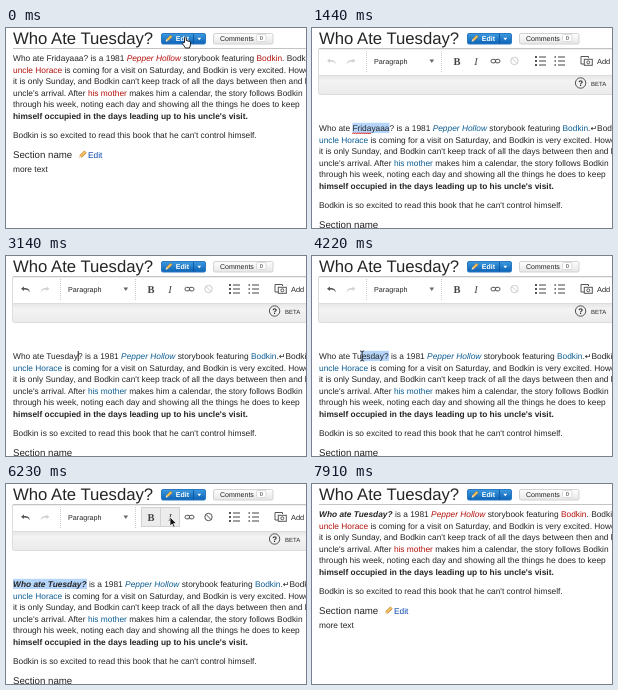
An HTML page for the animation above (8.26 s loop, 300 px wide and 200 px high).

```html
<!DOCTYPE html>
<html lang="en">
<head>
<meta charset="utf-8">
<title>Editing a page</title>
<style>
html, body { margin: 0; width: 100%; height: 100%; overflow: hidden; background: #fff; }
svg { display: block; width: 300px; height: 200px; }
text { font: 8.35px "Liberation Sans", Arial, sans-serif; fill: #252525; white-space: pre; text-rendering: geometricPrecision; }
.b { font-weight: bold; }
.i { font-style: italic; }
.link { fill: #b3100c; }
.edit .link { fill: #0b5c92; }
.edit .view { display: none; }
.blue { fill: #0645ad; }
.line { fill: none; stroke: #555; stroke-width: 1; }
.sep { stroke: #ccc; stroke-width: 1; stroke-dasharray: 1 1; }
.mark { font-family: "DejaVu Sans", sans-serif; font-size: 8px; }
.serif { font-family: "Liberation Serif", Times, serif; font-size: 10.5px; fill: #444; }
</style>
</head>
<body>
<svg viewBox="0 0 300 200">
  <defs>
    <linearGradient id="blue" x2="0" y2="1"><stop stop-color="#3d9ae0"/><stop offset="1" stop-color="#0b62b4"/></linearGradient>
    <linearGradient id="gray" x2="0" y2="1"><stop stop-color="#fff"/><stop offset="1" stop-color="#e6e6e6"/></linearGradient>
    <linearGradient id="band" x2="0" y2="1"><stop stop-color="#e6e6e6"/><stop offset=".3" stop-color="#f3f3f3"/><stop offset="1" stop-color="#ebebeb"/></linearGradient>
    <clipPath id="clip"><rect id="clipBox" y="20" width="300" height="0"/></clipPath>
    <g id="pencil">
      <path d="M2 6.6 7 1.6" stroke="#b9772a" stroke-width="3.2"/>
      <path d="M2.2 6.4 6.8 1.8" stroke="#f6c765" stroke-width="2"/>
      <path d="M0 8.6 1 5.4 3.2 7.6z" fill="#f4e3c4"/>
    </g>
    <path id="turn" d="M0 2.7 3 .4v1.6c3.7 0 5.5 1.1 5.8 4.4C7.6 4 6 3.4 3 3.4v1.6z"/>
  </defs>

  <g id="content">
    <rect id="sel" y="24.8" height="10.2" fill="#b5d5fb"/>
    <g id="lines"></g>
    <path id="squiggle" fill="none" stroke="#e0241c" stroke-width=".9"/>
    <path id="caret" d="M0 25v10" stroke="#111" stroke-width=".9"/>
    <g class="view">
      <use href="#pencil" x="72.5" y="122"/>
      <text class="blue" x="82" y="129.6">Edit</text>
    </g>
  </g>

  <g id="help">
    <path d="M300 47.5H6.5V64.5q0 2 2 2H300" fill="url(#band)" stroke="#dcdcdc"/>
    <circle cx="268.6" cy="55" r="5.2" class="line"/>
    <text class="b" x="266.3" y="57.9" style="font-size:8px">?</text>
    <text x="279" y="57.6" style="font-size:6px">BETA</text>
  </g>

  <g id="toolbar" clip-path="url(#clip)">
    <path d="M300 21H6.5V47.5H300" fill="#fff" stroke="#dcdcdc"/>
    <g id="pressed" fill="#ececec" stroke="#d2d2d2">
      <rect id="boldOn" x="135.5" y="23.5" width="19" height="19"/>
      <rect id="italicOn" x="154.5" y="23.5" width="19" height="19"/>
    </g>
    <path class="sep" d="M54.5 23v21M129.5 23v21"/>
    <use id="undo" href="#turn" x="15" y="30"/>
    <use href="#turn" transform="translate(43.5 30) scale(-1 1)" fill="#d0d0d0"/>
    <text x="62" y="36" style="font-size:7.2px">Paragraph</text>
    <path d="M117.5 31.4h4.6l-2.3 3.6z" fill="#666"/>
    <text class="serif b" x="141.6" y="36.6">B</text>
    <text class="serif i" x="162.2" y="36.6">I</text>
    <g class="line">
      <rect x="179" y="31.3" width="4.8" height="3.6" rx="1.8"/>
      <rect x="183.2" y="31.3" width="4.8" height="3.6" rx="1.8"/>
    </g>
    <g id="clear" class="line"><circle cx="202.5" cy="33" r="3.7"/><path d="M200 30.4l5 5.2"/></g>
    <g id="lists"></g>
    <g class="line">
      <path d="M269 36V28.5h7.5V30M269 36h3"/>
      <rect x="272.3" y="31.3" width="8" height="6" fill="#fff"/>
      <circle cx="276.3" cy="34.3" r="1.5"/>
    </g>
    <text x="285" y="36" style="font-size:7.4px">Add</text>
  </g>

  <path d="M7 20.5H300" stroke="#c4c4c4"/>
  <text x="7" y="16.3" style="font-size:16.7px">Who Ate Tuesday?</text>
  <rect x="155.5" y="5.5" width="44" height="10.5" rx="1.5" fill="url(#blue)" stroke="#2a78c0"/>
  <rect id="press" x="156" y="6" width="31" height="9.5" fill="#0a4f96" opacity=".25"/>
  <path d="M187.5 6v10" stroke="#0d5298" stroke-width=".8"/>
  <use href="#pencil" transform="translate(159.5 6.5) scale(.85)"/>
  <text class="b" x="169.8" y="13.2" style="font-size:7px;fill:#fff">Edit</text>
  <path d="M191.4 9.8h3.8l-1.9 2.5z" fill="#fff"/>
  <rect x="207.5" y="5.5" width="59.5" height="10.5" rx="1.5" fill="url(#gray)" stroke="#d2d2d2"/>
  <text x="214" y="13.2" style="font-size:7px">Comments</text>
  <rect x="250.5" y="6.5" width="9.5" height="7" rx="1" fill="#fff" stroke="#d2d2d2" stroke-width=".8"/>
  <text x="253.7" y="11.8" style="font-size:5.6px">0</text>

  <path id="hand" d="M2 6V1.2Q2.9-.3 3.8 1.2V4L8 5.2V8.4L7 11.5H3L0 7.2Q.4 5.6 2 6z" fill="#fff" stroke="#111" stroke-width=".9"/>
  <path id="beam" d="M-2-5Q0-5 0-3.8Q0-5 2-5M0-4V4M-2 5Q0 5 0 3.8Q0 5 2 5" fill="none" stroke="#222" stroke-width=".9"/>
  <path id="arrow" d="M0 0V9L2.1 7 3.6 10.3 5 9.7 3.6 6.5H6.4z" fill="#111" stroke="#fff" stroke-width=".7"/>
</svg>
<script>
const LOOP = 8260, LEFT = 7;
const $ = id => document.getElementById(id);
const el = Object.fromEntries([...document.querySelectorAll('[id]')].map(e => [e.id, e]));

// *red link*, _italic red link_
const mark = s => s
  .replace(/\*(.+?)\*/g, '<tspan class="link">$1</tspan>')
  .replace(/_(.+?)_/g, '<tspan class="link i">$1</tspan>');
const row = (y, s, attrs = '') => `<text x="${LEFT}" y="${y}" ${attrs}>${mark(s)}</text>`;

const story = [
  '<tspan id="name"></tspan> is a 1981 _Pepper Hollow_ storybook featuring *Bodkin*.<tspan id="gap"></tspan>Bodkin\'s',
  '*uncle Horace* is coming for a visit on Saturday, and Bodkin is very excited. However,',
  "it is only Sunday, and Bodkin can't keep track of all the days between then and his",
  "uncle's arrival. After *his mother* makes him a calendar, the story follows Bodkin",
  'through his week, noting each day and showing all the things he does to keep'
];
el.lines.innerHTML =
  story.map((s, i) => row(33 + i * 11.6, s)).join('') +
  row(91, "himself occupied in the days leading up to his uncle's visit.", 'class="b"') +
  row(110, "Bodkin is so excited to read this book that he can't control himself.") +
  row(129.6, 'Section name', 'style="font-size:9.7px"') +
  row(144, 'more text');
const name = $('name'), gap = $('gap');

el.lists.innerHTML = [223, 242].map((x, k) => [0, 1, 2].map(i => {
  const y = 29 + i * 4;
  return `<path d="M${x + 4} ${y}h7" stroke="#555" stroke-width="1.1"/>` +
    `<path d="M${x + k * .5} ${y}h${2 - k * .5}" stroke="#555" stroke-width="${k ? 1.4 : 2}"/>`;
}).join('')).join('');

let wave = 'M40.4 36';
for (let x = 0; x < 18; x++) wave += `l1.03 ${x % 2 ? 1.3 : -1.3}`;
el.squiggle.setAttribute('d', wave);

const FULL = 'Who ate Tuesday?';
const KEYS = [1940, 2060, 2240, 2440, 2630, 2810, 2930];
const FADE = [[240, 1], [640, .58], [1049, .58], [1050, 1], [6560, 1], [6900, .55], [7129, .55], [7130, 1]];
const OPEN = [[720, 0], [1040, 20]];
const CLOSE = [[7130, 20], [7340, 12], [7580, 9], [7610, 6], [7640, 3.5], [7850, 2], [7880, 1], [7910, 0]];
const DRAG = [[3650, 77], [3890, 66], [4100, 66], [4490, 10], [4730, 10], [4790, 7]];
const HAND_X = [[240, 176.5], [640, 173.5]], HAND_Y = [[240, 8.5], [640, 3]];
const ARROW_X = [[5120, 9], [5720, 145], [5990, 145], [6200, 164]];
const ARROW_Y = [[5120, 99], [5720, 33]];

function lerp(t, keys) {
  if (t <= keys[0][0]) return keys[0][1];
  for (let i = 1; i < keys.length; i++) {
    const [a, v] = keys[i - 1], [b, w] = keys[i];
    if (t < b) return v + (w - v) * (t - a) / (b - a);
  }
  return keys[keys.length - 1][1];
}
const hold = (t, keys) => keys.reduce((v, k) => t >= k[0] ? k[1] : v, keys[0][1]);
const show = (e, on) => { e.style.display = on ? '' : 'none'; };
const move = (e, x, y) => e.setAttribute('transform', `translate(${x} ${y})`);

function nameAt(t) {
  if (t >= 2930) return FULL;
  if (t >= KEYS[0]) return FULL.slice(0, 8 + KEYS.filter(k => k <= t).length) + '?';
  return 'Who ate Fridayaaa?';
}

function render(t) {
  const edit = t >= 1050 && t < 7130;
  const slide = t < 1050 ? lerp(t, OPEN) : hold(t, CLOSE);
  const bold = t >= 5990, italic = t >= 6230;

  el.content.setAttribute('class', edit ? 'edit' : '');
  el.content.style.opacity = lerp(t, FADE);
  move(el.content, 0, edit ? 70 : slide);
  el.clipBox.setAttribute('height', edit ? 28 : slide * 1.2);
  show(el.help, edit);

  name.textContent = nameAt(t);
  name.setAttribute('class', (bold ? 'b ' : '') + (italic ? 'i' : ''));
  gap.textContent = edit ? '↵' : ' ';
  gap.setAttribute('class', edit ? 'mark' : '');

  const word = t >= 1200 && t < 1940, drag = t >= 3650 && t < 7130;
  const edge = lerp(t, DRAG);
  const from = word ? 40.4 : edge;
  const to = word ? lerp(t, [[1200, 40.4], [1440, 77.4]]) : bold ? 81 : 77;
  show(el.sel, word || drag);
  el.sel.setAttribute('x', from);
  el.sel.setAttribute('width', Math.max(0, to - from));
  show(el.squiggle, edit && t < 1940);

  const typing = t >= 1940 && t < 3410;
  show(el.caret, typing);
  if (typing) {
    const last = name.textContent.length - 2;
    move(el.caret, name.getEndPositionOfChar(last).x + .3, 0);
  }

  el.undo.setAttribute('fill', t >= 1940 ? '#555' : '#d0d0d0');
  el.clear.style.opacity = bold ? 1 : .3;
  show(el.boldOn, bold);
  show(el.italicOn, italic);
  show(el.press, t >= 90 && t < 1050);

  show(el.hand, t < 1000);
  move(el.hand, lerp(t, HAND_X), lerp(t, HAND_Y));
  show(el.beam, t >= 3650 && t < 5120);
  move(el.beam, edge + 1.5, 100);
  show(el.arrow, t >= 5120 && t < 6560);
  move(el.arrow, lerp(t, ARROW_X), lerp(t, ARROW_Y));
}

const start = performance.now();
function tick() {
  render((performance.now() - start) % LOOP);
  requestAnimationFrame(tick);
}
render(0);
requestAnimationFrame(tick);
</script>
</body>
</html>
```
